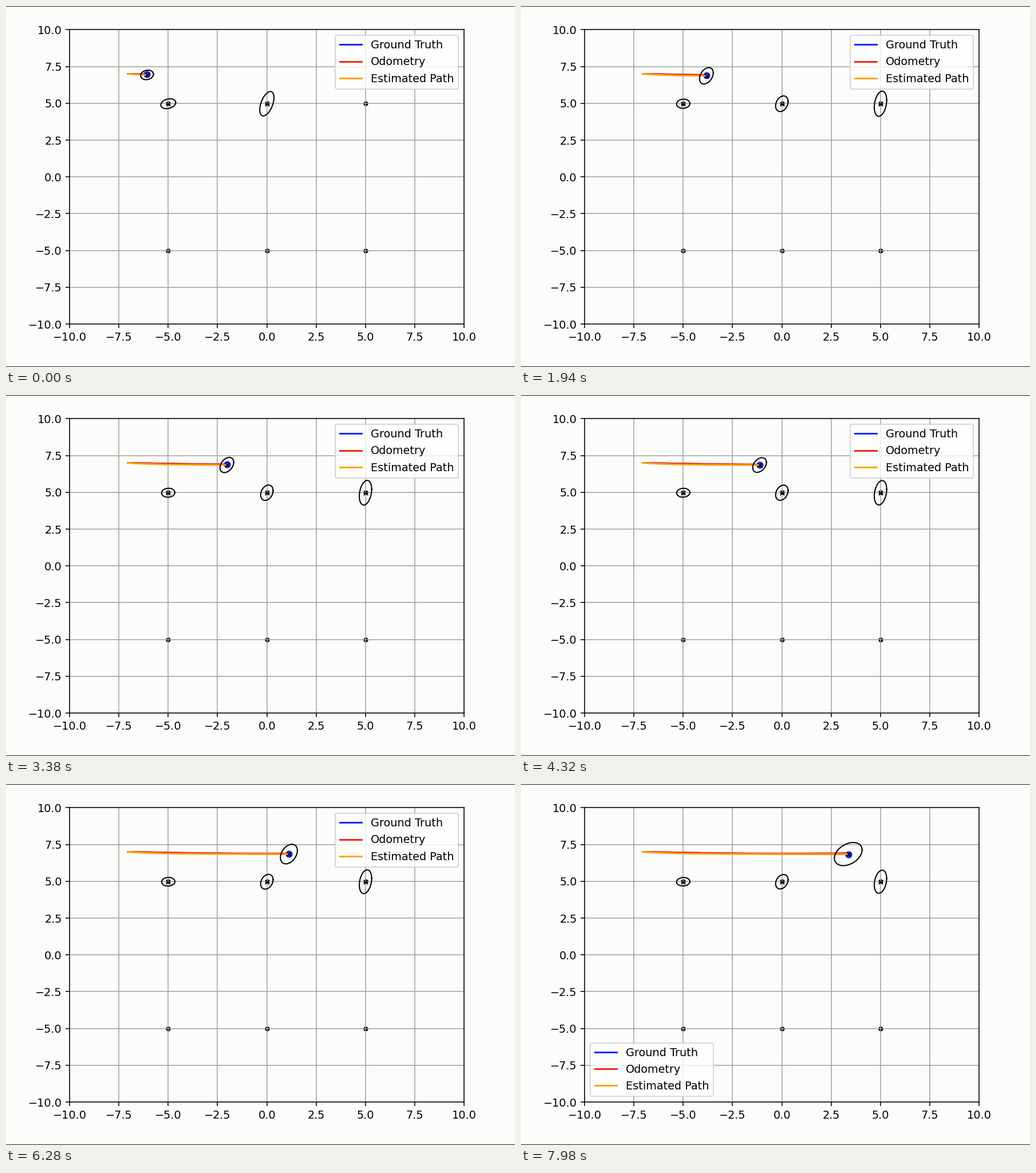
Write a matplotlib script that moves like this. It is 889 px wide and 630 px high and loops after 8 s.

```python
import numpy as np
import matplotlib.pyplot as plt
from matplotlib.animation import FuncAnimation
from matplotlib.lines import Line2D

W, H = 889, 630
DPI = W / 6.4
LOOP, TICK = 8000, 20
BLUE, RED, ORANGE = "#0024f4", "#f32009", "#ffa000"
PAPER = "#fcfcfa"
PX, PY = 1 / 34.45, 1 / 25.68      # axes units per pixel

# the robot advances by one hop every HOP_MS
HOP_MS, LEAD_MS, HOP = 380, 100, 0.4495
START, FIRST = -7.04, -6.075
REACH = 10.6                       # length of the drive
PASS_HOP = 3                       # first mark passed, third one detected
DRIFT_HOP = 13                     # second mark passed
LEGEND_LEFT = 3.47

plt.rcParams["font.family"] = "DejaVu Sans"
fig = plt.figure(figsize=((W + 0.01) / DPI, (H + 0.01) / DPI), dpi=DPI,
                 facecolor=PAPER)
ax = fig.add_axes([0.125, 75 / H, 0.775, 513.6 / H], facecolor=PAPER)
ax.set(xlim=(-10, 10), ylim=(-10, 10))
ax.grid(True, color="#a2a2a0")

# window border above and below the canvas
for y in (0.5, H - 0.5):
    fig.add_artist(Line2D([0, 1], [y / H, y / H], color="#202020",
                          lw=72 / DPI, antialiased=False))


def true_path(u):
    return 7 - 0.16 * u * (2 - u)


def odom_path(u):
    return 7 - 0.11 * np.sin(0.75 * np.pi * u)


def est_path(u):
    return 7 - 0.15 * (1 - np.exp(-7 * u))


ax.scatter([-5, 0, 5] * 2, [5] * 3 + [-5] * 3, s=13, c="k", linewidths=0.7,
           zorder=1)
robot = ax.scatter([0], [0], s=28, c=BLUE, zorder=1)
guess = ax.scatter([], [], s=15, c="k", marker="x", linewidths=0.7,
                   zorder=2.3)
paths = [(ax.plot([], [], color=color, label=name)[0], path)
         for color, name, path in ((BLUE, "Ground Truth", true_path),
                                   (RED, "Odometry", odom_path),
                                   (ORANGE, "Estimated Path", est_path))]
rings = [ax.plot([], [], "k", lw=1.05, zorder=2.4)[0] for _ in range(4)]

legends = [ax.legend(loc=loc, labelspacing=0.53, borderpad=0.42)
           for loc in ("upper right", "lower left")]
ax.add_artist(legends[0])
TURN = np.linspace(0, 2 * np.pi, 61)


def robot_spread(hop):
    """Half width, half height (pixels) and tilt of the robot's ellipse."""
    if hop < PASS_HOP:
        return 11.2, 8.3, 0.15
    drift = max(hop - DRIFT_HOP, 0)
    wide = 12 + 0.54 * drift ** 1.5
    tall = 15.5 - 0.25 * min(hop, DRIFT_HOP) + 2.8 * drift ** 0.5
    return wide, tall, 0.36


def mark_spreads(hop):
    """Ellipses of the marks seen so far, slowly tightening."""
    if hop < PASS_HOP:
        sizes = [(13, 8.6, 0.25), (12.4, 21.3, 0.5)]
    else:
        sizes = [(11.6, 8.2, 0.05), (10.9, 14, 0.28), (10.8, 22.5, 0.28)]
    return [(w, h * (1 - 0.005 * hop), tilt) for w, h, tilt in sizes]


def ellipse(x, y, spread):
    wide, tall, tilt = spread
    return (x + wide * PX * np.cos(TURN),
            y + tall * PY * np.sin(TURN + np.arcsin(tilt)))


def update(n):
    hop = (n * TICK + LEAD_MS) // HOP_MS
    x = FIRST + HOP * hop
    xs = np.linspace(START, x, 80)
    u = (xs - START) / REACH

    for line, path in paths:
        line.set_data(xs, path(u))
    robot.set_offsets([(x, true_path(u[-1]))])

    here = x, est_path(u[-1])
    items = [(*here, robot_spread(hop))]
    items += [(mx, 4.97, s) for mx, s in zip((-5, 0, 5), mark_spreads(hop))]
    for i, ring in enumerate(rings):
        ring.set_visible(i < len(items))
        if i < len(items):
            ring.set_data(*ellipse(*items[i]))
    guess.set_offsets([item[:2] for item in items])

    # the legend gives way once the robot's ellipse reaches it
    crowded = rings[0].get_xdata().max() > LEGEND_LEFT
    legends[0].set_visible(not crowded)
    legends[1].set_visible(crowded)
    return []


anim = FuncAnimation(fig, update, frames=LOOP // TICK, interval=TICK,
                     init_func=lambda: update(0), repeat=True, repeat_delay=0)
plt.show()
```
